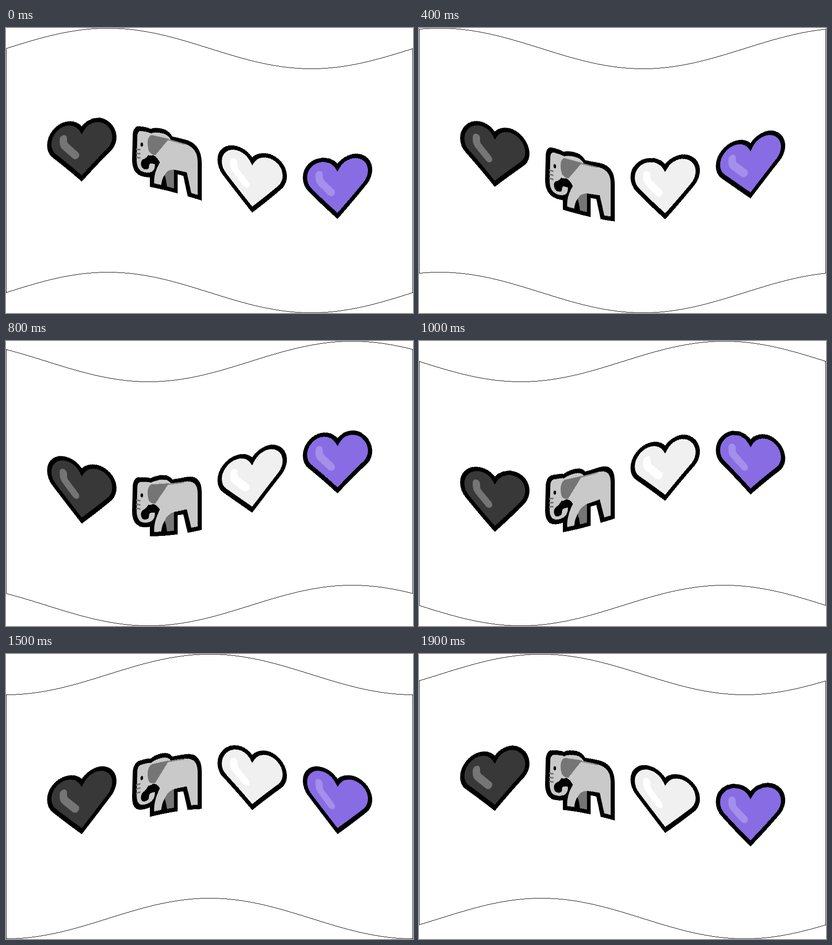
Recreate the animation shown at these times as an HTML page with a canvas. Size 894x626 px, loop 2000 ms.

```html
<!DOCTYPE html>
<html lang="en">
<head>
<meta charset="utf-8">
<title>Waving flag</title>
<style>
  html, body { margin: 0; width: 100%; height: 100%; overflow: hidden; background: #fff; }
  canvas { display: block; width: 894px; height: 626px; }
</style>
</head>
<body>
<canvas id="stage" width="894" height="626"></canvas>
<script>
const W = 894, H = 626, WAVE = 89, LOOP = 2000, STEP = 100;
const stage = document.getElementById('stage').getContext('2d');

// The flat flag is painted once, then waved column by column.
const flag = document.createElement('canvas');
flag.width = W;
flag.height = H - WAVE;
const art = flag.getContext('2d');

function fill(d, color) {
  art.fillStyle = color;
  art.fill(new Path2D(d));
}

function line(d, color, width, cap = 'butt') {
  art.strokeStyle = color;
  art.lineWidth = width;
  art.lineCap = cap;
  art.stroke(new Path2D(d));
}

function heart(cx, color, shine) {
  const r = 38.3, d = 33.2, q = Math.PI / 4;
  const notch = Math.acos(d / r);
  art.save();
  art.translate(cx, 239.7);
  art.beginPath();
  art.moveTo(0, d + r * Math.SQRT2);
  art.arc(-d, 0, r, 3 * q, 2 * Math.PI - notch);
  art.arc(d, 0, r, Math.PI + notch, 2 * Math.PI + q);
  art.closePath();
  art.fillStyle = color;
  art.fill();
  art.strokeStyle = '#000';
  art.lineWidth = 9.4;
  art.stroke();
  line('M-40.5 -6.5 V0 Q-40.5 7 -34.5 13 L-13.5 35', shine, 16, 'round');
  art.restore();
}

function elephant() {
  // silhouette
  fill(`M277 285 L278.5 229 Q281 211 294 210.5 H304 Q312 210 318 212.5
    Q324 207.5 340 206.5 Q358 206 365 218 L396 217 C418 217 430 231 430 258
    V340 H399 L389.5 298 H377 V340 H316 V319 Q312 320 304 320
    C284 320 277 306 277 285 Z`, '#000');
  // far leg
  fill('M348 306 Q355 291 369 289 V331 H353.5 Q352 316 348 306 Z', '#757575');
  // head, trunk, body and near legs
  fill(`M287 285 L288.5 231 Q290 221 296 220.5 H309 Q314 220.5 319 222
    Q326 217 342 216.5 Q356 216 362 226 L397 227 C414 229 421 240 421 258
    V330.5 H407 L397 288 L369 290 Q355 293 349 306 Q342 317 341 330.5 H325.5
    Q324 308 338 282 Q331 270 323 269 Q318 272 313 270.5
    Q307 280 301 282 Q296 286 296.5 293 C297 301 302 304 306 303
    Q314 303 314 296 Q314 288 320 288 H327 C328 304 318 310 306 310
    C292 310 287 300 287 285 Z`, '#c9c9c9');
  // ear and fold along the back
  fill('M320 225.5 H358 L328 268 Q319 269 314 262 C309 247 310 230 320 225.5 Z', '#757575');
  fill('M356 226 L396 226.5 L390 229 H355 Z', '#888');
  for (const y of [262, 271, 280]) line(`M287 ${y} h7`, '#757575', 3.6, 'round');
  art.beginPath();
  art.ellipse(298.3, 250, 2.8, 4.5, 0, 0, 2 * Math.PI);
  art.fillStyle = '#000';
  art.fill();
}

function paintFlag() {
  art.fillStyle = '#fff';
  art.fillRect(0, 0, W, flag.height);
  heart(166.5, '#383838', '#757575');
  elephant();
  heart(540.8, '#f0f0f0', '#fff');
  heart(728.2, '#886ce4', '#a48fea');
  art.strokeStyle = '#000';
  art.lineWidth = 1;
  art.strokeRect(0.5, 0.5, W - 1, flag.height - 1);
}

function draw(t) {
  const phase = Math.floor((t % LOOP) / STEP) * STEP / LOOP;
  stage.fillStyle = '#fff';
  stage.fillRect(0, 0, W, H);
  for (let x = 0; x < W; x++) {
    const y = Math.round(WAVE / 2 * (1 - Math.sin(2 * Math.PI * (x / W + phase))));
    stage.drawImage(flag, x, 0, 1, flag.height, x, y, 1, flag.height);
  }
}

paintFlag();
const start = performance.now();
function tick() {
  draw(performance.now() - start);
  requestAnimationFrame(tick);
}
tick();
</script>
</body>
</html>
```
